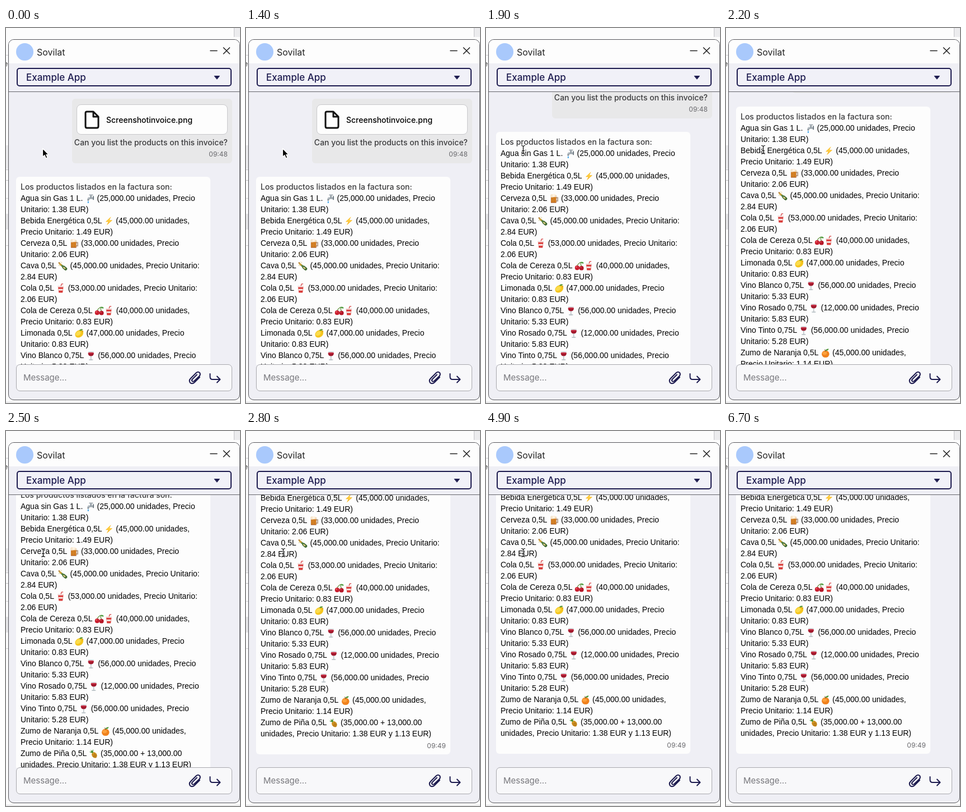
Write an HTML page that moves like this. It is 418 by 668 pixels and loops after 6800 ms.

```html
<!DOCTYPE html>
<html lang="en">
<head>
<meta charset="utf-8">
<title>Chat assistant</title>
<style>
  * { box-sizing: border-box; }
  html, body { margin: 0; width: 100%; height: 100%; overflow: hidden; }
  body { position: relative; background: #fcfcfc; font: 14px/20px Inter, sans-serif; color: #111; }
  body *, .abs { white-space: nowrap; }
  .abs { position: absolute; }
  svg { display: block; overflow: visible; }
  #page i { position: absolute; display: block; }
  #page span { position: absolute; left: -4px; font: 13px/16px "Liberation Sans", sans-serif; color: #333; }
  #win { left: 4px; top: 20px; width: 414px; height: 643px; border: 1px solid #55555a; border-radius: 10px; background: #efeff5; }
  #head { left: 5px; top: 21px; width: 412px; height: 42px; background: #fdfdfd; border-radius: 9px 9px 0 0; }
  #mark { left: 18px; top: 27px; width: 31px; height: 31px; border-radius: 50%; background: #a9c9fc; }
  #name { left: 55px; top: 33px; font-size: 16px; color: #222; }
  #pick { left: 19px; top: 71px; width: 384px; height: 33px; border: 2px solid #1d1b4f; border-radius: 5px; background: #f1f1f8; }
  #pick b { position: absolute; left: 15px; top: 5px; font-weight: 500; font-size: 17px; color: #1d1b4f; }
  #rule { left: 5px; top: 113px; width: 412px; height: 1px; background: #66666c; }
  #view { left: 5px; top: 114px; width: 412px; height: 486px; overflow: hidden; }
  #feed { left: -5px; top: -114px; width: 418px; height: 820px; }
  #ask { left: 118px; top: 126px; width: 286px; height: 115px; border-radius: 6px; background: #e8e8e9; }
  #file { left: 8px; top: 10px; width: 270px; height: 54px; border: 1px solid #c9c9cc; border-radius: 8px; background: #fdfdfd; }
  #file b { position: absolute; left: 52px; top: 17px; font-weight: 500; color: #000; }
  #ask p { position: absolute; right: 8px; top: 68px; margin: 0; font-weight: 500; color: #3c3c3e; }
  #reply { left: 18px; top: 265px; width: 347px; height: 535px; padding: 8px; border-radius: 6px; background: #fdfdfd; }
  #reply div { height: 20px; font: 14px/20px "Liberation Sans", Arial, sans-serif; color: #000; }
  #reply .lead { font: 500 14px/20px Inter, sans-serif; color: #3c3c3e; }
  .time { position: absolute; right: 8px; font-size: 12px; color: #68686c; }
  .ico { display: inline-block; width: 17.5px; height: 17.5px; vertical-align: -4px; }
  #box { left: 18px; top: 599px; width: 386px; height: 48px; border: 1px solid #a9a9ae; border-radius: 7px; background: #f8f8fa; }
  #box span { position: absolute; left: 12px; top: 13px; font-size: 15px; color: #77777c; }
  #ui { left: 0; top: 0; fill: none; stroke: #1d1b4f; stroke-width: 2; stroke-linecap: round; stroke-linejoin: round; }
</style>
</head>
<body>
<div id="page"></div>
<div id="win" class="abs"></div>
<div id="head" class="abs"></div>
<div id="mark" class="abs"></div>
<div id="name" class="abs">Sovilat</div>
<div id="pick" class="abs"><b>Example App</b></div>
<div id="rule" class="abs"></div>
<div id="view" class="abs">
  <div id="feed" class="abs">
    <div id="ask" class="abs">
      <div id="file" class="abs">
        <svg class="abs" style="left:13px;top:10px" width="28" height="34" fill="none" stroke="#111" stroke-width="3" stroke-linejoin="round">
          <path d="M16 2H4.500Q2 2 2 4.500V28Q2 31 4.500 31H22Q25 31 25 28V11ZV11H25"/>
        </svg>
        <b>Screenshotinvoice.png</b>
      </div>
      <p>Can you list the products on this invoice?</p>
      <span class="time" style="top:89px">09:48</span>
    </div>
    <div id="reply" class="abs"><div class="lead">Los productos listados en la factura son:</div></div>
  </div>
</div>
<div id="box" class="abs"><span>Message...</span></div>
<svg id="ui" class="abs" width="418" height="668">
  <path stroke="#222" stroke-width="1.600" d="M365 40.500H377M388.500 35L399.500 46M399.500 35L388.500 46"/>
  <path fill="#1d1b4f" stroke-width="1" d="M372.500 85.500H381.500L377 91Z"/>
  <path d="M346 622L337 631Q333 635 329 632Q326 628 330 624L340 614Q343 611.500 346 614Q348 617 345.500 620L336 629Q334 630.500 332.500 629Q331 627.500 333 625.500L341 617.500"/>
  <path d="M364.500 616V621Q364.500 626 369 626H382M377 620.500L382.500 626L377 631.500"/>
  <path id="arrow" fill="#000" stroke="#fff" stroke-width="1.200" d="M65.500 214.500V229.500L69 226.500L71.500 232L74 231L71.700 225.500H76Z"/>
  <g id="beam">
    <path id="stem" stroke="#fff" stroke-width="2.600" d="M63.500 209.500Q66.500 209.500 66.500 211.500Q66.500 209.500 69.500 209.500M66.500 211V222M63.500 224Q66.500 224 66.500 222Q66.500 224 69.500 224M64.500 218.500H68.500"/>
    <use href="#stem"/>
    <path stroke="#000" stroke-width="1.200" d="M63.500 209.500Q66.500 209.500 66.500 211.500Q66.500 209.500 69.500 209.500M66.500 211V222M63.500 224Q66.500 224 66.500 222Q66.500 224 69.500 224M64.500 218.500H68.500"/>
  </g>
</svg>
<script>
const $ = id => document.getElementById(id);

// Page edges showing around the chat window
const strip = (x, y, w, h, color) =>
  `<i style="left:${x}px;top:${y}px;width:${w}px;height:${h}px;background:${color}"></i>`;
$('page').innerHTML = [
  strip(407, 0, 1, 16, '#c4c4c6'), strip(408, 0, 10, 16, '#ececee'),
  strip(0, 48, 4, 1, '#d0d0d2'), strip(0, 209, 4, 42, '#ececee'),
  strip(0, 252, 4, 1, '#c4c4c6'), strip(0, 271, 4, 1, '#c4c4c6'),
  strip(0, 303, 4, 1, '#d4d4d6'), strip(0, 331, 4, 28, '#e6e6e8'),
  strip(0, 387, 4, 1, '#d0d0d2'), strip(0, 666, 418, 1, '#d8d8da')
].join('') + '<span style="top:56px">e</span><span style="top:107px">r</span>';

// Small food icons on an 18 x 18 grid
const p = (fill, d) => `<path fill="${fill}" d="${d}"/>`;
const line = (color, w, d) => `<path fill="none" stroke="${color}" stroke-width="${w}" stroke-linecap="round" d="${d}"/>`;
const dot = (color, x, y, rx, ry = rx) => `<ellipse fill="${color}" cx="${x}" cy="${y}" rx="${rx}" ry="${ry}"/>`;
const icons = {
  tap: line('#8d979e', 3.4, 'M15 8H9Q6 8 6 11.500') + line('#c9d1d6', 1.2, 'M15 7.500H9Q6 7.500 5.500 10') +
    line('#75818a', 2, 'M11 7V3.500') + line('#a4adb3', 2, 'M8.500 2.500H14') + p('#707b83', 'M14.500 4.500h2v7h-2z') +
    p('#4aa8ea', 'M6 13Q8.500 17 6 17.500Q3.500 17 6 13Z'),
  bolt: p('#f9b51c', 'M13 1L3 10.500H8L5 17L15.500 7.500H10Z') + p('#ffd44a', 'M12 2.500L5 9.500H9.500L8 13L13 8.300H8.500Z'),
  beer: line('#b9a18c', 2, 'M12 7.500H15.500V13.500H12') + p('#a5521b', 'M3 5H13V17H3Z') + p('#e8962b', 'M4 6H6V16H4ZM7 6H9V16H7ZM10 6H12V16H10Z') +
    dot('#f5e6cf', 5, 4, 3) + dot('#fff3e2', 9, 3.5, 3) + dot('#f0dcc0', 12, 4.5, 2),
  fizz: line('#3f6a32', 5.5, 'M10.500 11.500L14 14.500') + line('#4d7a3a', 3.2, 'M4.500 6.500L10 11') + line('#d2a43a', 3, 'M3 5L5.500 7.200') +
    line('#e7d28a', 2.4, 'M10.500 12L12.500 13.500') + dot('#b98a4a', 2, 3.5, 1.5) + line('#d9ca93', 1, 'M5 2L7 3M1.500 7.500L2 9'),
  cup: line('#d43a3a', 1.3, 'M9 6L10.500 1L13 .8') + p('#d93a38', 'M4 6H14L12.500 17H5.500Z') + p('#f3d9d6', 'M3.500 4.500H14.500V7H3.500Z') +
    p('#f6e6e2', 'M5 10H13L12.700 13H5.300Z'),
  cherry: line('#5b8a34', 1.2, 'M4.500 10Q6 5 11 2.500Q11.500 7 13 10') + p('#4c9a3a', 'M11 2.500Q14 0 17.500 4Q13.500 6 11 2.500Z') +
    dot('#c91f30', 5, 12.5, 4.2) + dot('#b51728', 13, 13, 4) + dot('#ee6a70', 3.8, 11, 1.2) + dot('#e6545e', 11.8, 11.5, 1),
  lemon: `<g transform="rotate(-35 9 10)">${dot('#f5c51e', 9, 10, 8, 6.4)}${dot('#fbdc4c', 8, 8.5, 5.2, 3.6)}${dot('#e0a91a', 16.5, 10, 1.5)}</g>` +
    p('#5f9a35', 'M9 4Q11 0 16 2Q14 5.500 9 4Z'),
  wine: p('#d8dde0', 'M4 1H14Q15.500 10 9 10.500Q2.500 10 4 1Z') + p('#a3182c', 'M3.800 4H14.200Q14.500 9.500 9 9.700Q3.500 9.500 3.800 4Z') +
    dot('#c83146', 9, 4, 5.1, 1.1) + line('#b4bcc1', 1.4, 'M9 10.500V15.500') + dot('#bcc4c8', 9, 16.4, 4, 1.1),
  orange: dot('#f0821e', 9, 11, 7, 6.5) + dot('#fba13c', 7.5, 9.5, 4, 3) + p('#4f9636', 'M9 5Q10 1 15 1.500Q14 5.500 9 5Z') + line('#6e5a2c', 1.2, 'M9 6L8 3'),
  pine: `<g transform="rotate(-35 9 10)">${dot('#d99a22', 9, 12, 4.4, 5.8)}${line('#a56a17', .8, 'M6 9L12 15M5 12L9.500 17M12 9L6 15M13 12L8.500 17')}` +
    p('#4b8f35', 'M9 8L4.500 2L8 3.500L9 0L10 3.500L13.500 2Z') + '</g>'
};
const icon = key => `<svg class="ico" viewBox="0 0 18 18">${icons[key]}</svg>`;

const unit = ' unidades, Precio';
const rows = [
  ['Agua sin Gas 1 L.', 'tap', '25,000.00' + unit, 'Unitario: 1.38'],
  ['Bebida Energética 0,5L', 'bolt', '45,000.00 unidades,', 'Precio Unitario: 1.49'],
  ['Cerveza 0,5L', 'beer', '33,000.00' + unit, 'Unitario: 2.06'],
  ['Cava 0,5L', 'fizz', '45,000.00' + unit + ' Unitario:', '2.84'],
  ['Cola 0,5L', 'cup', '53,000.00' + unit + ' Unitario:', '2.06'],
  ['Cola de Cereza 0,5L', 'cherry cup', '40,000.00 unidades,', 'Precio Unitario: 0.83'],
  ['Limonada 0,5L', 'lemon', '47,000.00' + unit, 'Unitario: 0.83'],
  ['Vino Blanco 0,75L', 'wine', '56,000.00' + unit, 'Unitario: 5.33'],
  ['Vino Rosado 0,75L', 'wine', '12,000.00' + unit, 'Unitario: 5.83'],
  ['Vino Tinto 0,75L', 'wine', '56,000.00' + unit, 'Unitario: 5.28'],
  ['Zumo de Naranja 0,5L', 'orange', '45,000.00 unidades,', 'Precio Unitario: 1.14'],
  ['Zumo de Piña 0,5L', 'pine', '35,000.00 + 13,000.00', 'unidades, Precio Unitario: 1.38 EUR y 1.13']
];
$('reply').innerHTML += rows.map(([name, keys, first, second]) =>
  `<div>${name} ${keys.split(' ').map(icon).join('')} (${first}</div><div>${second} EUR)</div>`
).join('') + '<span class="time" style="top:510px">09:49</span>';

// Scroll offset over time: [ms, px]
const LOOP = 6800, STEP = 100;
const track = [[0, 0], [1400, 0], [1900, 80], [2500, 169], [2800, 224], [2900, 225], [LOOP, 225]];
function offset(t) {
  const i = track.findIndex(([end]) => end > t);
  const [t0, y0] = track[i - 1], [t1, y1] = track[i];
  return Math.round(y0 + (y1 - y0) * (t - t0) / (t1 - t0));
}

function draw() {
  const t = Math.floor(performance.now() % LOOP / STEP) * STEP;
  const y = offset(t);
  const overText = y > 56;
  $('feed').style.transform = `translateY(${-y}px)`;
  $('arrow').style.display = overText ? 'none' : '';
  $('beam').style.display = overText && t < 5600 ? '' : 'none';
  requestAnimationFrame(draw);
}
draw();
</script>
</body>
</html>
```
